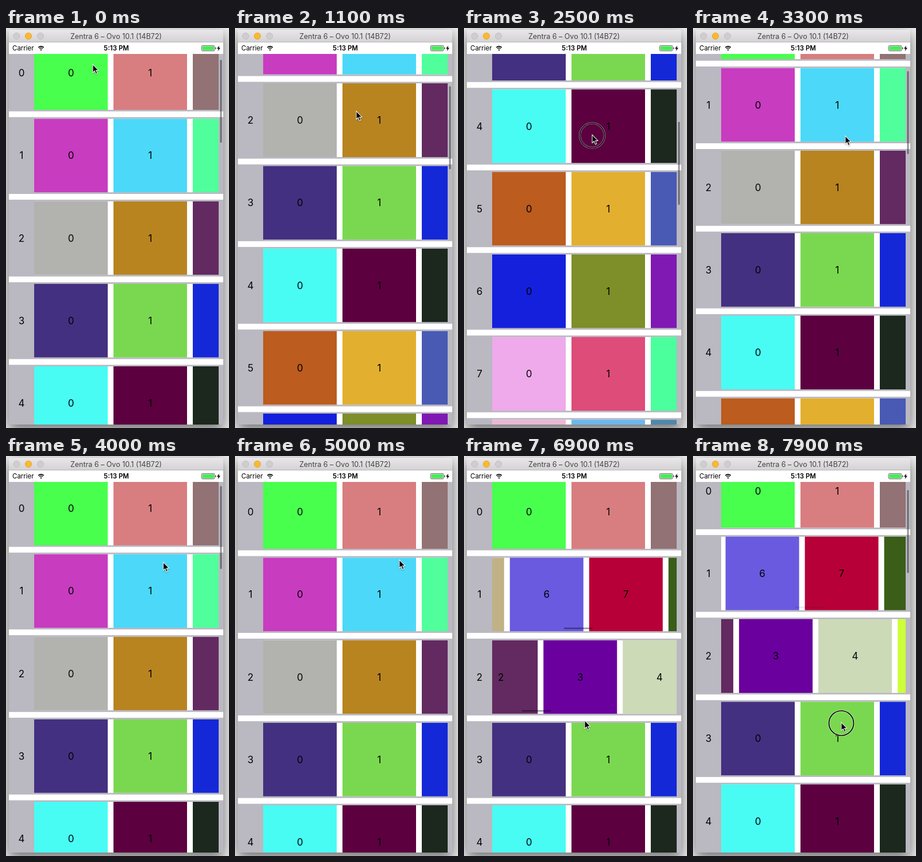
An HTML page with a canvas that plays this animation: 388x694 px, repeating every 8 s.

```html
<!DOCTYPE html>
<html lang="en">
<head>
<meta charset="utf-8">
<title>Nested scrolling</title>
<style>
html, body { margin: 0; width: 100%; height: 100%; overflow: hidden; }
canvas { display: block; width: 388px; height: 694px; }
</style>
</head>
<body>
<canvas id="stage"></canvas>
<script>
const W = 388, H = 694, LOOP = 8000, STEP = 100;
const PITCH = 143.25, CELL = 128, CELL_PITCH = 138;
const FONT = 'Inter, Roboto, sans-serif';
const canvas = document.getElementById('stage');
const c = canvas.getContext('2d');
const dpr = window.devicePixelRatio || 1;
canvas.width = W * dpr;
canvas.height = H * dpr;

const colors = [
  ['#48ff4e', '#d87e80', '#927274'],
  ['#c83cc0', '#4cd8f8', '#50ff9c', '#7a8a30', '#c98f68', '#c0b285', '#6a5ae0', '#b80038', '#3a5e18'],
  ['#b2b2ae', '#b88420', '#622a60', '#6a009e', '#ccdab8', '#ccff3a'],
  ['#443080', '#7ad850', '#1428d8'],
  ['#48fcf4', '#5c0040', '#1c281e'],
  ['#bc5c1e', '#e2b02e', '#485ab4'],
  ['#1420dc', '#7e8e28', '#8018b4'],
  ['#eeaaea', '#de4c7a', '#4aff9c'],
  ['#ecb8d4', '#6ab8ee', '#5088a8']
];

// Pointer path: time, x, y
const path = [
  [0, 151, 63], [1100, 211, 144], [1500, 220, 297], [1700, 222, 187],
  [2500, 223, 185], [2800, 225, 348], [3300, 265, 187], [5000, 286, 180],
  [5150, 300, 225], [5360, 58, 235], [6000, 274, 364], [6100, 276, 368],
  [6350, 86, 372], [7100, 255, 490], [7700, 258, 498.5], [7900, 258, 462], [8000, 258, 444]
];
const presses = [[1500, 1700], [2500, 2800], [5150, 5360], [6100, 6350], [7700, 8000]];

const clamp = (v, a = 0, b = 1) => Math.min(b, Math.max(a, v));
const ramp = (t, a, b) => clamp((t - a) / (b - a));
const glide = t => 1 - Math.exp(-Math.max(0, t) / 500);
const flick = (t, start, end, drag, coast) => drag * ramp(t, start, end) + coast * glide(t - end);

function scrollY(t) {
  if (t <= 1500) return 19 + 230 * glide(t);
  if (t <= 2500) return 238 + flick(t, 1500, 1700, 110, 190);
  if (t < 7700) return Math.max(0, 500 - flick(t, 2500, 2800, 163, 364));
  return 36.5 * (t - 7700) / 200;
}

function scrollX(row, t) {
  if (row === 1) return flick(t, 5150, 5360, 242, 582);
  if (row === 2) return flick(t, 6100, 6350, 190, 202);
  return 0;
}

function pointer(t) {
  const i = path.findIndex(p => p[0] > t);
  const [t0, x0, y0] = path[i - 1], [t1, x1, y1] = path[i];
  const k = ramp(t, t0, t1);
  return [x0 + (x1 - x0) * k, y0 + (y1 - y0) * k];
}

function rect(x, y, w, h, fill) {
  c.fillStyle = fill;
  c.fillRect(x, y, w, h);
}

function pill(x, y, w, h, r, fill) {
  c.fillStyle = fill;
  c.beginPath();
  c.roundRect(x, y, w, h, r);
  c.fill();
}

function circle(x, y, r, stroke, width, fill) {
  c.beginPath();
  c.arc(x, y, r, 0, 7);
  if (fill) { c.fillStyle = fill; c.fill(); }
  c.strokeStyle = stroke;
  c.lineWidth = width;
  c.stroke();
}

function text(s, x, y, size, fill = '#000', align = 'center', weight = 400) {
  c.font = `${weight} ${size}px ${FONT}`;
  c.textAlign = align;
  c.fillStyle = fill;
  c.fillText(s, x, y + size * 0.364);
}

function shape(points, fill) {
  c.beginPath();
  points.forEach(p => c.lineTo(...p));
  c.closePath();
  c.fillStyle = fill;
  c.fill();
}

function clipped(x, y, w, h, draw) {
  c.save();
  c.beginPath();
  c.rect(x, y, w, h);
  c.clip();
  draw();
  c.restore();
}

function drawRow(row, mid, t) {
  rect(5, mid - 66.6, 373, 133.25, '#bab8c1');
  text(row, 27, mid, 17);
  clipped(49, mid - 64, 321, CELL, () => {
    rect(49, mid - 64, 321, CELL, '#fff');
    const offset = scrollX(row, t);
    for (let i = Math.floor(offset / CELL_PITCH); i < 15; i++) {
      const x = 49 + i * CELL_PITCH - offset;
      if (x > 370) break;
      rect(x, mid - 64, CELL, CELL, colors[row][i] || `hsl(${(row * 67 + i * 101) % 360} 60% 55%)`);
      text(i, x + 64, mid, 17);
    }
    const shown = row === 1 ? ramp(t, 5140, 5200) * (1 - ramp(t, 7600, 8000))
      : row === 2 ? ramp(t, 6090, 6150) * (1 - ramp(t, 7400, 7700)) : 0;
    if (shown) pill(51 + 0.154 * offset, mid + 57.5, 50, 2.5, 1.2, `rgba(0,0,0,${0.4 * shown})`);
  });
}

function drawTable(t) {
  rect(5, 25, 373, 663, '#fff');
  const top = scrollY(t);
  clipped(5, 45, 373, 643, () => {
    colors.forEach((_, row) => {
      const mid = 97 + row * PITCH - top;
      if (mid > -40 && mid < 760) drawRow(row, mid, t);
    });
    const shown = t < 7700 ? 1 - ramp(t, 4600, 4900) : 1;
    if (shown) pill(372.5, 50.7 + 0.2245 * top, 3, 144, 1.5, `rgba(0,0,0,${0.42 * shown})`);
  });
}

function drawWindow() {
  rect(0, 0, W, H, '#ececec');
  c.save();
  c.shadowColor = 'rgba(0,0,0,.55)';
  c.shadowBlur = 22 * dpr;
  c.shadowOffsetY = 8 * dpr;
  pill(5, 3, 373, 685, 4, '#fff');
  c.restore();
  const bar = c.createLinearGradient(0, 3, 0, 25);
  bar.addColorStop(0, '#e9e7e9');
  bar.addColorStop(1, '#d3d1d3');
  pill(5, 3, 373, 22, [4, 4, 0, 0], bar);
  rect(5, 24, 373, 1, '#b9b7b9');
  [[18.5, '#cfcdcf', '#bbb9bb'], [39, '#fcb830', '#dfa023'], [60, '#cfcdcf', '#bbb9bb']]
    .forEach(([x, fill, edge]) => circle(x, 14, 5.6, edge, 0.8, fill));
  text('Zentra 6 – Ovo 10.1 (14B72)', 191.5, 14.5, 12.5, '#444');
}

function drawStatus() {
  text('Carrier', 11, 35, 11.5, '#000', 'left');
  text('5:13 PM', 192, 35, 11.5, '#000', 'center', 600);
  c.strokeStyle = '#000';
  c.lineWidth = 1.6;
  [3.8, 6.6].forEach(r => {
    c.beginPath();
    c.arc(61, 38.5, r, -2.36, -0.78);
    c.stroke();
  });
  shape([[61, 39.6], [59.3, 37.7], [61, 37], [62.7, 37.7]], '#000');
  c.lineWidth = 0.8;
  c.strokeStyle = '#444';
  c.beginPath();
  c.roundRect(340.4, 30.4, 22.6, 9.4, 1.8);
  c.stroke();
  pill(341.5, 31.5, 20.4, 7.2, 1, '#4ce85c');
  pill(364, 33.4, 1.4, 3.4, 0.7, '#444');
  shape([[371.2, 30.5], [367, 35.8], [369.6, 35.8], [368.6, 40], [373, 34.4], [370.3, 34.4]], '#000');
}

function drawPointer(t) {
  const [x, y] = pointer(t);
  if (presses.some(([a, b]) => t >= a && t < b)) {
    circle(x, y + 1.5, 21.5, 'rgba(255,255,255,.6)', 3.2);
    circle(x, y + 1.5, 21.5, '#000', 1.7);
  }
  c.save();
  c.translate(x, y);
  c.lineJoin = 'round';
  c.shadowColor = 'rgba(0,0,0,.35)';
  c.shadowBlur = 2 * dpr;
  c.shadowOffsetY = dpr;
  shape([[-0.5, -1], [-0.5, 15.5], [3, 12.4], [5.3, 17.6], [8.5, 16.2], [6.3, 11.2], [11, 11]], '#fff');
  c.shadowColor = 'transparent';
  shape([[0.5, 1.4], [0.5, 13.2], [3.4, 10.6], [5.8, 16.2], [7.2, 15.6], [4.9, 10.1], [8.8, 9.9]], '#000');
  c.restore();
}

function frame(now) {
  const t = Math.floor((now % LOOP) / STEP) * STEP;
  c.setTransform(dpr, 0, 0, dpr, 0, 0);
  drawWindow();
  drawTable(t);
  drawStatus();
  drawPointer(t);
  requestAnimationFrame(frame);
}
requestAnimationFrame(frame);
</script>
</body>
</html>
```
